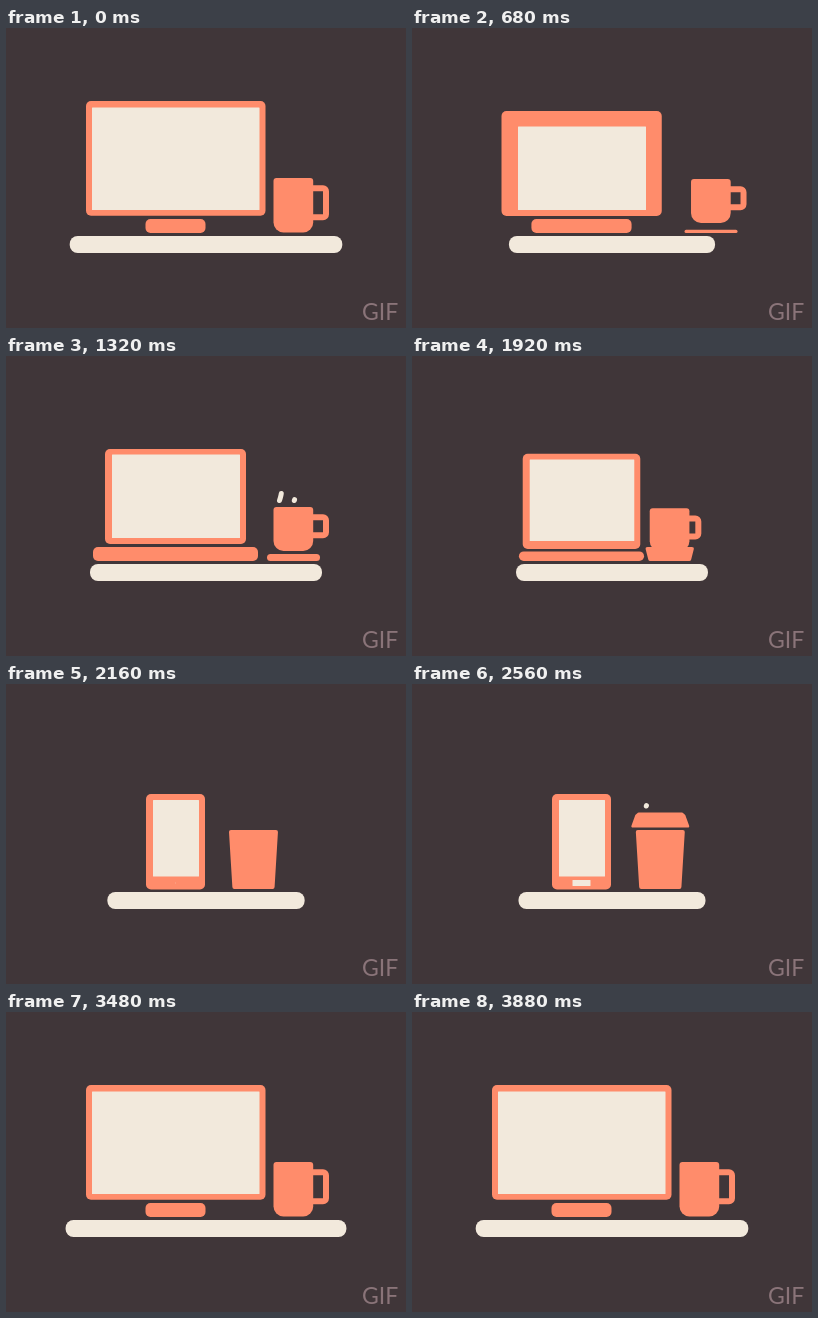
An HTML page with a canvas for the animation above (3920 ms loop, 400 by 300 pixels).

```html
<!DOCTYPE html>
<html lang="en">
<head>
<meta charset="utf-8">
<title>Desk</title>
<style>
  html, body { margin: 0; width: 100%; height: 100%; overflow: hidden; background: #403639; }
  canvas { display: block; }
  .label {
    position: absolute; left: 356px; top: 269px;
    font: 400 23px/28px Lato, sans-serif; color: #8a7479;
  }
</style>
</head>
<body>
<canvas id="stage" width="400" height="300"></canvas>
<div class="label">GIF</div>
<script>
const ctx = document.getElementById('stage').getContext('2d');
const LOOP = 3920, STEP = 40;
const BG = '#403639', CORAL = '#ff8c6b', CREAM = '#f2e9dc';

const smooth = p => p * p * (3 - 2 * p);
const back = p => 1 + 2 * (p - 1) ** 3 + (p - 1) ** 2;
const clamp = p => Math.max(0, Math.min(1, p));
const mix = (a, b, p) => Array.isArray(a) ? a.map((v, i) => mix(v, b[i], p)) : a + (b - a) * p;

// Applies moves [start, end, target, ease] in turn to a first value.
const follow = (first, moves) => t => moves.reduce((value, [start, end, target, ease = smooth]) =>
  t < start ? value : mix(value, target, ease(clamp((t - start) / (end - start)))), first);

// One value per scene: desktop, laptop, phone, and back to desktop.
const tour = ([desk, laptop, phone], toLaptop, toPhone, toDesk) => {
  const targets = [laptop, phone, desk];
  return follow(desk, [toLaptop, toPhone, toDesk].map(([start, end, ease], i) => [start, end, targets[i], ease]));
};

const shrink = [1800, 2140], grow = [2940, 3460, back];
const mugDown = [1900, 2120], mugUp = [3120, 3410, back];
const lift = [570, 670], saucer = [600, 770], taper = [1780, 1930];

// Boxes are [left, top, right, bottom].
const tracks = {
  frame: tour([[80, 73, 259.5, 187.8], [99, 93, 240, 188], [140, 110, 199, 205.5]], [600, 760], shrink, grow),
  glass: tour([[86, 79.5, 253.5, 182], [106, 98.5, 234, 182], [147, 116, 193, 192.5]], [200, 560], shrink, grow),
  base: tour([[139.5, 191, 199.5, 205], [87, 191, 252, 205], [150, 205, 189, 205]],
    [600, 790], [1800, 2120], [3030, 3230]),
  button: tour([0, 0, 1], saucer, [2140, 2300], [2840, 2940]),
  shelf: follow(136.3, [[570, 720, 96], [720, 1160, 116, back], [1720, 2010, 90], [2010, 2240, 102],
    [2240, 2480, 93.5], [3090, 3400, 147], [3400, 3800, 136.3, back]]),
  cupX: follow(287.5, [[570, 780, 309], [780, 1160, 287.5, back], [1800, 2240, 248.3, back],
    [2960, 3400, 287.5, back]]),
  mugTop: tour([150, 151, 201], lift, mugDown, mugUp),
  mugBottom: tour([204.5, 195, 203], lift, mugDown, mugUp),
  tilt: tour([0, 0, 8], lift, [2140, 2200], [3060, 3290]),
  handleW: tour([16, 16, 0], lift, [1830, 2110], [3220, 3440, back]),
  handleH: tour([35, 24, 35], lift, [2120, 2200], mugUp),
  cupTop: tour([205, 198, 146], saucer, [1855, 2140], [2960, 3360]),
  rimHalf: tour([26.5, 26.5, 24.6], saucer, taper, [3400, 3440]),
  footHalf: tour([26.5, 26.5, 21], saucer, taper, [3400, 3440]),
  lid: tour([0, 0, 1], saucer, [2180, 2440, back], [2880, 3020])
};

function box([l, t, r, b], radius, color) {
  const w = r - l, h = b - t;
  if (w <= 0 || h <= 0.1) return;
  ctx.fillStyle = color;
  ctx.beginPath();
  ctx.roundRect(l, t, w, h, Array.isArray(radius) ? radius : Math.min(radius, w / 2, h / 2));
  ctx.fill();
}

function poly(points, radius) {
  const n = points.length, [a, b] = [points[n - 1], points[0]];
  ctx.beginPath();
  ctx.moveTo((a[0] + b[0]) / 2, (a[1] + b[1]) / 2);
  points.forEach((p, i) => ctx.arcTo(...p, ...points[(i + 1) % n], radius));
  ctx.closePath();
  ctx.fillStyle = CORAL;
  ctx.fill();
}

function drawMug(s) {
  const x = s.cupX, top = s.mugTop, height = s.mugBottom - top;
  if (height < 4) return;
  ctx.save();
  ctx.translate(x, 190);
  ctx.rotate(s.tilt * Math.PI / 180);
  ctx.translate(-x, -190);
  box([x - 20, top, x + 19.7, s.mugBottom], height > 14 ? [3, 3, 10, 10] : 2, CORAL);
  if (s.handleW > 3) {
    const right = x + 16.5 + s.handleW, left = x + 17, y = top + 10.3, low = y + s.handleH - 6;
    ctx.strokeStyle = CORAL;
    ctx.lineWidth = 6;
    ctx.lineCap = 'butt';
    ctx.beginPath();
    ctx.moveTo(left, y);
    ctx.arcTo(right, y, right, low, 3);
    ctx.arcTo(right, low, left, low, 3);
    ctx.lineTo(left, low);
    ctx.stroke();
  }
  ctx.restore();
}

function drawCup(s) {
  const x = s.cupX, top = s.cupTop, h = 205 - top;
  if (h > 0.2) {
    poly([[x - s.rimHalf, top], [x + s.rimHalf, top], [x + s.footHalf, 205], [x - s.footHalf, 205]],
      Math.min(h / 2, h < 10 ? 3.5 : 2));
  }
  if (s.lid > 0.01) {
    ctx.save();
    ctx.translate(x, top - 2.5);
    ctx.scale(s.lid, s.lid);
    poly([[-29.5, 0], [-25, -12.5], [-22, -15], [22, -15], [25, -12.5], [29.5, 0]], 1.5);
    ctx.restore();
  }
}

// Three wavy wisps rise once per scene; the tail chases the head.
function drawSteam(t) {
  ctx.strokeStyle = CREAM;
  ctx.lineWidth = 5;
  ctx.lineCap = ctx.lineJoin = 'round';
  for (let scene = 0; scene < 3; scene++) {
    const start = 20 + 1269 * scene;
    const [x, y] = scene < 2 ? [287.5, 144.5] : [248.3, 122];
    const height = scene ? 55 : 69;
    [-14, 0.8, 11].forEach((dx, i) => {
      const age = t - start - i * 28;
      const reach = height * (i === 1 ? 1 : 0.85);
      const head = reach * (1 - (1 - clamp(age / 400)) ** 2);
      const tail = reach * smooth(clamp((age - 160) / 360));
      if (tail >= head) return;
      ctx.beginPath();
      for (let k = 0; k <= 24; k++) {
        const d = mix(tail, head, k / 24);
        ctx.lineTo(x + dx + 2 * Math.sin(d * Math.PI / 20), y - d);
      }
      ctx.stroke();
    });
  }
}

function draw(t) {
  const s = {};
  for (const name in tracks) s[name] = tracks[name](t);
  ctx.fillStyle = BG;
  ctx.fillRect(0, 0, 400, 300);
  box([200 - s.shelf, 208, 200 + s.shelf, 225], 8, CREAM);
  box(s.base, 5, CORAL);
  box(s.frame, 5, CORAL);
  box(s.glass, 0.5, CREAM);
  const w = 9 * s.button, h = 3 * s.button;
  box([169.5 - w, 199 - h, 169.5 + w, 199 + h], 0.5, CREAM);
  drawMug(s);
  drawCup(s);
  drawSteam(t);
}

function tick() {
  const t = performance.now() % LOOP;
  draw(Math.floor(t / STEP) * STEP);
  requestAnimationFrame(tick);
}
tick();
</script>
</body>
</html>
```
